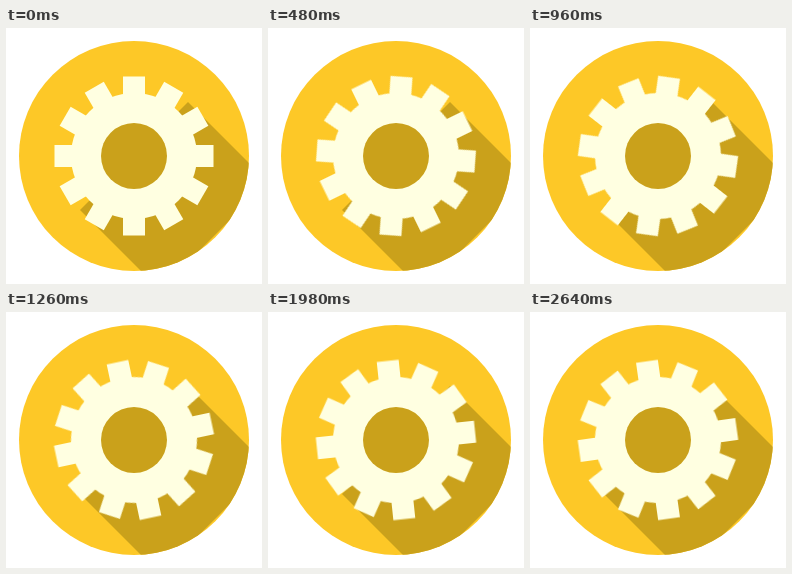
Write an HTML page without scripts that moves like this. It is 256 px wide and 256 px high and loops after 2700 ms.

```html
<!DOCTYPE html>
<html lang="en">
<head>
<meta charset="utf-8">
<title>Turning gear</title>
<style>
  html, body { margin: 0; width: 100%; height: 100%; overflow: hidden; background: #fff; }
  svg { display: block; width: 100%; height: 100%; }
  .disc { fill: #fdc827; }
  .shade { fill: #caa11b; }
  .gear {
    fill: #ffffe1;
    animation: turn 2.7s steps(45) infinite;
  }
  @keyframes turn { to { transform: rotate(360deg); } }
</style>
</head>
<body>
<svg viewBox="-128 -128 256 256">
  <defs>
    <clipPath id="rim"><circle r="115"/></clipPath>
    <!-- one bar makes two opposite teeth -->
    <rect id="bar" x="-11" y="-79.5" width="22" height="159"/>
  </defs>
  <circle class="disc" r="115"/>
  <path class="shade" clip-path="url(#rim)" d="M54-54l80 80L26 134-54 54z"/>
  <g class="gear">
    <circle r="63"/>
    <use href="#bar"/>
    <use href="#bar" transform="rotate(30)"/>
    <use href="#bar" transform="rotate(60)"/>
    <use href="#bar" transform="rotate(90)"/>
    <use href="#bar" transform="rotate(120)"/>
    <use href="#bar" transform="rotate(150)"/>
  </g>
  <circle class="shade" r="33"/>
</svg>
</body>
</html>
```
